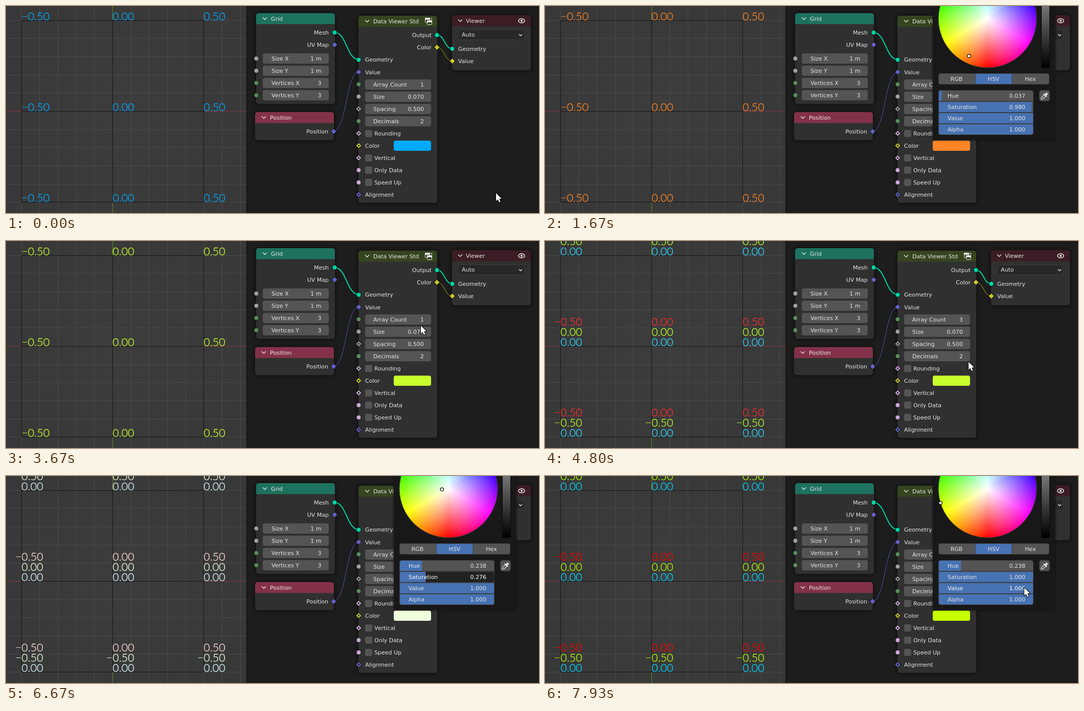
Write an HTML page with a canvas that moves like this. It is 1042 px wide and 406 px high and loops after 8000 ms.

```html
<!DOCTYPE html>
<html lang="en">
<head>
<meta charset="utf-8">
<title>Node editor colour picker</title>
<style>
  html, body { margin: 0; width: 100%; height: 100%; overflow: hidden; background: #1d1d1d; }
  canvas { display: block; }
</style>
</head>
<body>
<canvas id="stage" width="1042" height="406"></canvas>
<script>
const ctx = document.getElementById('stage').getContext('2d');
const LOOP = 8000;
const TEXT = '#e6e6e6', FIELD = '#545454', HOVER = '#656565', EDIT = '#222222', BLUE = '#4772b3', EDGE = '#3d3d3d';
const TEAL = '#00d6a3', VECTOR = '#6363c7', INT = '#598c5c', FLOAT = '#a1a1a1', BOOL = '#cca6d6', COLOR = '#c7c729';
const WHEEL = { x: 865, y: 25, r: 96 };

// Keyframes: [time, ...values]
const CURSOR = [
  [0, 958, 367], [70, 956, 366], [300, 880, 325], [530, 797, 270], [670, 797, 270], [930, 920, 40],
  [2400, 788, 45], [2530, 800, 68], [2800, 934, 276], [2870, 938, 287], [3000, 880, 280], [3130, 812, 266],
  [3270, 812, 266], [3670, 811, 166], [3800, 814, 152], [4470, 814, 152], [4600, 854, 190],
  [4800, 828, 237], [4870, 822, 243], [5000, 808, 258], [5200, 797, 267], [5470, 797, 267],
  [5800, 880, 225], [6130, 942, 196], [7700, 942, 198], [7800, 950, 212], [7930, 937, 219]
];
const MARKER = [
  [930, 920, 40], [1130, 903, 90], [1300, 866, 112], [1470, 843, 106], [1530, 840, 104],
  [1670, 829, 98], [1870, 803, 78], [2070, 790, 52], [2200, 788, 45]
];
const SATURATION = [[6270, .975], [6670, .276], [6870, .02], [7130, .02], [7600, 1]];

function at(keys, t) {
  const i = keys.findIndex(k => k[0] > t);
  if (i === 0) return keys[0].slice(1);
  if (i < 0) return keys[keys.length - 1].slice(1);
  const a = keys[i - 1], b = keys[i], p = (t - a[0]) / (b[0] - a[0]);
  return a.slice(1).map((v, j) => v + (b[j + 1] - v) * p);
}
const within = (t, a, b) => t >= a && t < b;

// Colour: the sliders hold linear HSV, the wheel shows display HSV.
const encode = v => v <= .0031308 ? v * 12.92 : 1.055 * v ** (1 / 2.4) - .055;
const decode = v => v <= .04045 ? v / 12.92 : ((v + .055) / 1.055) ** 2.4;
const toRgb = (h, s) => [5, 3, 1].map(n => {
  const k = (n + h * 6) % 6;
  return 1 - s * Math.max(0, Math.min(k, 4 - k, 1));
});
function toHs([r, g, b]) {
  const max = Math.max(r, g, b), d = max - Math.min(r, g, b);
  if (!d) return [0, 0];
  const h = max === r ? (g - b) / d + 6 : max === g ? (b - r) / d + 2 : (r - g) / d + 4;
  return [h % 6 / 6, d / max];
}
const display = (h, s) => toRgb(h, s).map(encode);
const css = rgb => `rgb(${rgb.map(v => Math.round(v * 255))})`;

function pickedColor(t) {
  if (t < 930) return [.6, 1];
  if (t >= 6270) return [.238, at(SATURATION, t)[0]];
  const [x, y] = at(MARKER, t), dx = x - WHEEL.x, dy = y - WHEEL.y;
  const hue = (Math.atan2(-dx, dy) / (2 * Math.PI) + 1) % 1;
  return toHs(toRgb(hue, Math.min(1, Math.hypot(dx, dy) / WHEEL.r)).map(decode));
}

// Drawing helpers
function box(x, y, w, h, fill, r = 4, stroke) {
  ctx.beginPath();
  ctx.roundRect(x, y, w, h, r);
  ctx.fillStyle = fill;
  ctx.fill();
  if (stroke) line(stroke);
}
function line(color, width = 1) {
  ctx.strokeStyle = color;
  ctx.lineWidth = width;
  ctx.stroke();
}
function poly(points, close) {
  ctx.beginPath();
  points.forEach(([x, y]) => ctx.lineTo(x, y));
  if (close) ctx.closePath();
}
function label(str, x, y, align = 'left', color = TEXT) {
  ctx.font = '11px "DejaVu Sans", sans-serif';
  ctx.textAlign = align;
  ctx.fillStyle = color;
  ctx.fillText(str, x, y + 4);
}
function chevron(x, y, s = 4) {
  poly([[x - s, y - s / 2], [x, y + s / 2], [x + s, y - s / 2]]);
  line(TEXT, 1.3);
}
function socket(x, y, color, kind = 'circle') {
  if (kind === 'circle') {
    ctx.beginPath();
    ctx.arc(x, y, 4.6, 0, 7);
  } else poly([[x, y - 5.5], [x + 5.5, y], [x, y + 5.5], [x - 5.5, y]], true);
  ctx.fillStyle = color;
  ctx.fill();
  line('#111');
  if (kind === 'dot') {
    ctx.beginPath();
    ctx.arc(x, y, 1.7, 0, 7);
    ctx.fillStyle = '#111';
    ctx.fill();
  }
}
function link(x1, y1, x2, y2, color, width) {
  const middle = (x1 + x2) / 2;
  ctx.beginPath();
  ctx.moveTo(x1, y1);
  ctx.bezierCurveTo(middle, y1, middle, y2, x2, y2);
  line('rgba(0,0,0,.4)', width + 1.5);
  line(color, width);
}
function shadowed(draw, blur) {
  ctx.save();
  ctx.shadowColor = 'rgba(0,0,0,.6)';
  ctx.shadowBlur = blur;
  draw();
  ctx.restore();
}
function node(x, y, w, h, color, title, chevronX, titleX) {
  shadowed(() => box(x - 1, y - 1, w + 2, h + 2, '#141414', 6), 8);
  box(x, y, w, h, '#303030', 5);
  box(x, y, w, 21.5, color, [5, 5, 0, 0]);
  chevron(chevronX, y + 10.5);
  label(title, titleX, y + 10.5);
}
function field(x, y, name, value, valueX, labelX, fill = FIELD) {
  box(x, y - 10, 129, 20, fill);
  label(name, labelX, y);
  label(value, valueX, y, 'right');
}

function viewport(base, s, count) {
  const bg = ctx.createRadialGradient(235, 203, 40, 235, 203, 330);
  bg.addColorStop(0, '#3c3c3c');
  bg.addColorStop(1, '#373737');
  ctx.fillStyle = bg;
  ctx.fillRect(0, 0, 470, 406);
  const hline = (y, x1, x2, color) => { ctx.fillStyle = color; ctx.fillRect(x1, Math.round(y), x2 - x1, 1); };
  const vline = (x, y1, y2, color) => { ctx.fillStyle = color; ctx.fillRect(Math.round(x), y1, 1, y2 - y1); };
  for (let k = -5; k <= 7; k++) {
    vline(208 + k * 35.65, 0, 406, '#4a4a4a');
    hline(206 + k * 35.65, 0, 470, '#4a4a4a');
  }
  hline(206, 0, 470, '#833541');
  vline(208, 0, 406, '#5d8a1e');
  const columns = [30, 208, 386], rows = [28, 206, 384];
  rows.forEach(y => hline(y, 30, 387, '#161616'));
  columns.forEach(x => vline(x, 28, 385, '#161616'));

  const colors = count === 1 ? [base] : [0, .255, .555].map(h => display(h, s));
  ctx.font = '300 21.5px Lato, sans-serif';
  ctx.textAlign = 'left';
  columns.forEach((x, i) => rows.forEach((y, j) => {
    [(i - 1) / 2, (1 - j) / 2, 0].slice(0, count).forEach((value, n) => {
      const minus = value < 0 ? '\u2212' : '';
      const hang = count > 1 ? ctx.measureText(minus).width : 0;
      const glyphs = [minus + Math.abs(value).toFixed(2), x + .3 - hang, y - 20 * (count - 1 - n) - .5];
      ctx.fillStyle = ctx.strokeStyle = css(colors[n]);
      ctx.lineWidth = .35;
      ctx.fillText(...glyphs);
      ctx.strokeText(...glyphs);
    });
  }));
}

function groupIcon(x, y) {
  box(x + .5, y + .5, 9, 9, '#36451f', 1, TEXT);
  box(x, y, 10, 4, TEXT, 1);
  box(x + 4.5, y + 5.5, 9, 8, '#36451f', 1, TEXT);
  box(x + 4, y + 5, 10, 4, TEXT, 1);
  poly([[x + 11, y + 1], [x + 13.5, y + 1], [x + 13.5, y + 4]]);
  line(TEXT);
}

function nodes(base, count, cursor, t) {
  ctx.fillStyle = '#1d1d1d';
  ctx.fillRect(470, 0, 572, 406);
  ctx.fillStyle = '#151515';
  ctx.fillRect(470, 0, 2, 406);
  ctx.fillStyle = '#222';
  for (let x = 494; x < 1042; x += 36.5)
    for (let y = 17; y < 406; y += 36.5) ctx.fillRect(Math.round(x), Math.round(y), 1, 1);

  node(489, 14, 154, 178, '#1d725e', 'Grid', 506, 518);
  label('Mesh', 631, 52, 'right');
  label('UV Map', 631, 76, 'right');
  [['Size X', '1 m'], ['Size Y', '1 m'], ['Vertices X', '3'], ['Vertices Y', '3']]
    .forEach(([name, value], i) => field(502, 103 + i * 24, name, value, 616.5, 519));

  node(487, 208, 154, 55, '#83314a', 'Position', 504, 516);
  label('Position', 630, 246, 'right');

  node(689, 19, 154, 367, '#36451f', 'Data Viewer Std', 706, 718);
  groupIcon(819, 23);
  label('Output', 832, 57, 'right');
  label('Color', 832, 81, 'right');
  label('Geometry', 702, 105);
  label('Value', 702, 130);
  const popupOpen = isPopupOpen(t);
  const hovered = y => !popupOpen && within(cursor[0], 702, 831) && Math.abs(cursor[1] - y) < 10;
  [['Array Count', count], ['Size', '0.070'], ['Spacing', '0.500'], ['Decimals', '2']].forEach(([name, value], i) => {
    const y = 154 + i * 24, editing = !i && within(t, 4070, 4470);
    field(702, y, name, value, 817, 718, editing ? EDIT : hovered(y) ? HOVER : FIELD);
  });
  [['Rounding', 250], ['Vertical', 298], ['Only Data', 322], ['Speed Up', 346]].forEach(([name, y]) => {
    box(702, y - 7, 14, 14, hovered(y) ? HOVER : FIELD, 3);
    label(name, 720, y);
  });
  label('Color', 702, 274);
  box(758, 264, 73, 20, css(base));
  label('Alignment', 702, 370);

  node(872, 18, 154, 108, '#3c1d26', 'Viewer', 888, 899);
  ctx.beginPath();
  ctx.ellipse(1008, 29, 6, 4, 0, 0, 7);
  line(TEXT, 1.5);
  ctx.beginPath();
  ctx.arc(1008, 29, 2, 0, 7);
  ctx.fillStyle = TEXT;
  ctx.fill();
  box(883.5, 46.5, 130, 20, '#282828', 4, EDGE);
  label('Auto', 891, 56);
  chevron(1006, 57, 3);
  label('Geometry', 884, 84);
  label('Value', 884, 108);

  link(642.5, 52, 689.5, 105, TEAL, 2);
  link(640.5, 246, 689.5, 129.5, VECTOR, 1);
  link(842.5, 57, 872.5, 84, TEAL, 2);
  link(842.5, 81, 872.5, 108, COLOR, 1);

  [[642.5, 52, TEAL], [642.5, 76, VECTOR, 'diamond'], [489.5, 103, FLOAT], [489.5, 127, FLOAT],
   [489.5, 151, INT], [489.5, 175, INT], [640.5, 246, VECTOR, 'diamond'],
   [842.5, 57, TEAL], [842.5, 81, COLOR, 'diamond'], [872.5, 84, TEAL], [872.5, 108, COLOR, 'diamond']
  ].forEach(s => socket(...s));
  [[TEAL], [VECTOR, 'diamond'], [INT], [FLOAT], [FLOAT, 'dot'], [INT], [BOOL, 'dot'], [COLOR, 'dot'],
   [BOOL, 'dot'], [BOOL], [BOOL], [VECTOR, 'dot']
  ].forEach(([color, kind], i) => socket(689.5, 105.5 + i * 24.05, color, kind));
}

function popup(base, h, s, cursor, t) {
  shadowed(() => box(758, -120, 239.5, 383, '#181818', 4), 4);

  const { x, y, r } = WHEEL;
  const hues = ctx.createConicGradient(Math.PI / 2, x, y);
  for (let i = 0; i <= 6; i++) hues.addColorStop(i / 6, css(toRgb(i / 6 % 1, 1)));
  const white = ctx.createRadialGradient(x, y, 0, x, y, r);
  white.addColorStop(0, '#fff');
  white.addColorStop(1, 'rgba(255,255,255,0)');
  ctx.beginPath();
  ctx.arc(x, y, r, 0, 7);
  for (const fill of [hues, white]) {
    ctx.fillStyle = fill;
    ctx.fill();
  }
  line(EDGE);
  const [hue, sat] = toHs(base), angle = hue * 2 * Math.PI;
  ctx.beginPath();
  ctx.arc(x - Math.sin(angle) * sat * r, y + Math.cos(angle) * sat * r, 3.2, 0, 7);
  ctx.fillStyle = '#fff';
  ctx.fill();
  line('#000', 1.2);

  const ramp = ctx.createLinearGradient(0, 0, 0, 121);
  ramp.addColorStop(0, '#757575');
  ramp.addColorStop(1, '#000');
  box(970.5, -71, 16, 192, ramp, 2, '#080808');

  box(769.5, 132.5, 216, 21, FIELD, 4, EDGE);
  box(841, 132.5, 72, 21, BLUE, 0, EDGE);
  [['RGB', 804.5], ['HSV', 877], ['Hex', 949]].forEach(([name, cx]) => label(name, cx, 143, 'center'));

  [['Hue', h], ['Saturation', s], ['Value', 1], ['Alpha', 1]].forEach(([name, value], i) => {
    const cy = 176 + i * 22, editing = i === 1 && within(t, 6270, 7700);
    const hover = within(cursor[0], 769, 954) && Math.abs(cursor[1] - cy) < 11 && !within(t, 930, 2470);
    const color = editing || hover ? '#fff' : TEXT;
    const outline = new Path2D();
    outline.roundRect(769.5, cy - 10.5, 185, 21, i === 0 ? [4, 4, 0, 0] : i === 3 ? [0, 0, 4, 4] : 0);
    ctx.save();
    ctx.clip(outline);
    ctx.fillStyle = editing ? EDIT : FIELD;
    ctx.fillRect(769, cy - 11, 186, 22);
    ctx.fillStyle = BLUE;
    ctx.fillRect(769, cy - 11, 186 * value, 22);
    ctx.restore();
    ctx.strokeStyle = EDGE;
    ctx.lineWidth = 1;
    ctx.stroke(outline);
    label(name, 787, cy, 'left', color);
    label(value.toFixed(3), 939, cy, 'right', color);
  });

  box(966.5, 165.5, 20, 21, FIELD, 4, EDGE);
  poly([[970, 183], [971, 179], [976, 174], [979, 177], [974, 182]], true);
  line(TEXT, 1.2);
  poly([[975, 172], [981, 178]]);
  line(TEXT, 2);
  poly([[978, 175], [982, 171]]);
  line(TEXT, 4);
}

function pointer([x, y]) {
  const shape = [[0, 0], [0, 15.5], [3.6, 12.2], [6, 18], [8.6, 16.9], [6.2, 11.3], [11, 11]];
  poly(shape.map(([dx, dy]) => [x + dx, y + dy]), true);
  line('#000', 2);
  ctx.fillStyle = '#fff';
  ctx.fill();
}

const isPopupOpen = t => within(t, 670, 2950) || t >= 5470;
const isPointerHidden = t => within(t, 930, 2470) || within(t, 4070, 4470) || within(t, 6270, 7700);

function render(now) {
  // The screen refreshes 15 times a second.
  const tick = Math.floor((now % LOOP + 5) * .015);
  const t = Math.min(Math.round(tick * 20 / 3) * 10, LOOP - 1);
  const [h, s] = pickedColor(t), base = display(h, s);
  const count = t < 4200 ? 1 : t < 4330 ? 2 : 3;
  const cursor = at(CURSOR, t);
  ctx.lineJoin = 'round';
  viewport(base, s, count);
  nodes(base, count, cursor, t);
  if (isPopupOpen(t)) popup(base, h, s, cursor, t);
  if (!isPointerHidden(t)) pointer(cursor);
}

let start;
function loop(now) {
  start ??= now;
  render(now - start);
  requestAnimationFrame(loop);
}
render(0);
requestAnimationFrame(loop);
</script>
</body>
</html>
```
